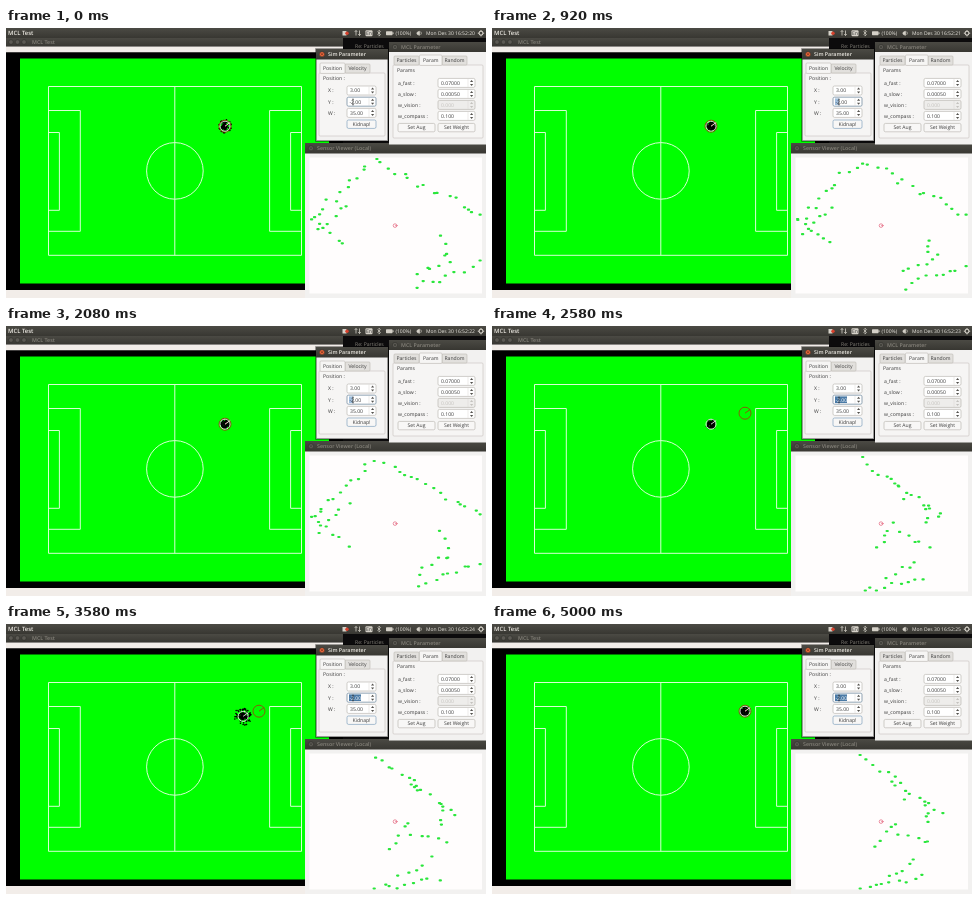
Write an HTML page that moves like this. It is 480 px wide and 270 px high and loops after 5.08 s.

```html
<!DOCTYPE html>
<html lang="en">
<head>
<meta charset="utf-8">
<title>MCL Test</title>
<style>
  html, body { margin: 0; width: 100%; height: 100%; overflow: hidden; background: #000; }
  svg { display: block; width: 480px; height: 270px; }
  text { font: 5.1px "Open Sans", "Noto Sans", sans-serif; fill: #3c3c3c; text-rendering: geometricPrecision; white-space: pre; }
  .title { font-weight: 600; font-size: 5.3px; fill: #eeebe4; }
  .head { font-size: 5.9px; }
  .tray { font-weight: 400; font-size: 5px; }
  .dim { fill: #85827a; }
  .off { fill: #c4c2be; }
  .mid { text-anchor: middle; }
</style>
</head>
<body>
<svg id="stage" viewBox="0 0 480 270"></svg>
<script>
const LOOP = 5080, TICK = 250 / 3, LAST = 60;
const SELECT = 3, KIDNAP = 27;
const HOME = [219, 98.2], GOAL = [253, 87.2];

// Field lines in the robot's view, as x1, y1, x2, y2.
const BEFORE = [
  [371, 133, 475, 188], [362, 139, 306, 191], [306, 192, 340, 216], [341, 178, 311, 205],
  [436, 209, 442, 230], [441, 232, 412, 244], [411, 260, 474, 236]];
const AFTER = [
  [369, 132, 450, 192], [404, 154, 412, 171], [436, 180, 434, 200], [403, 198, 384, 224],
  [408, 207, 437, 221], [424, 237, 396, 252], [430, 254, 370, 265]];

const rect = (x, y, w, h, fill, more = '') =>
  `<rect x="${x}" y="${y}" width="${w}" height="${h}" fill="${fill}" ${more}/>`;
const text = (x, y, s, cls = '', more = '') => `<text x="${x}" y="${y}" class="${cls}" ${more}>${s}</text>`;
const disc = (x, y, r, fill, more = '') => `<circle cx="${x}" cy="${y}" r="${r}" fill="${fill}" ${more}/>`;
const ring = (x, y, r, color, w) => disc(x, y, r, 'none', `stroke="${color}" stroke-width="${w}"`);
const path = (d, color, w = 1, more = '') =>
  `<path d="${d}" fill="none" stroke="${color}" stroke-width="${w}" ${more}/>`;
const edge = (c, r = 1) => `stroke="${c}" stroke-width=".6" rx="${r}"`;
const knob = (x, y, r, fill = '#5b5953') => disc(x, y, r, fill, 'stroke="#2b2a27" stroke-width=".5"');

const titleBar = (x, y, w, h, s, active) =>
  rect(x, y, w, h, 'url(#bar)') + knob(x + 6, y + h / 2, 2.6, active ? '#e8653a' : undefined) +
  path(`M${x + 5} ${y + h / 2 - 1}l2 2m0-2l-2 2`, active ? '#5a2412' : '#35342f', .6) +
  text(x + 12, y + h / 2 + 2, s, active ? 'title' : 'title dim');

const tab = (x, y, w, s, on) =>
  rect(x, y + (on ? 0 : 1), w, on ? 10.4 : 9, on ? '#f6f5f4' : '#e2e0dd', edge('#bdb9b4')) +
  text(x + w / 2, y + 7.2, s, 'mid');

const spin = (x, y, w, value, off) =>
  rect(x, y, w, 9, off ? '#eeedeb' : '#fff', edge('#b4b0aa', 1.5)) +
  path(`M${x + w - 7} ${y + .5}v8`, '#d8d5d0', .5) +
  `<path d="M${x + w - 5} ${y + 3.5}l1.6-2l1.6 2zm0 2l1.6 2l1.6-2z" fill="${off ? '#c4c2be' : '#55534f'}"/>` +
  text(x + 3, y + 6.4, value, off ? 'off' : '');

const button = (x, y, w, s, color = '#b4b0aa') =>
  rect(x, y, w, 8.4, '#f8f7f6', edge(color, 1.5)) + text(x + w / 2, y + 6, s, 'mid');

function panel() {
  const ink = '#d5d1c8';
  return rect(0, 0, 480, 10, 'url(#bar)') + text(2, 7, 'MCL Test', 'title head') +
    rect(336.5, 3, 4, 4.5, ink) + disc(341, 5.2, 1.7, '#d8402c') +
    path('M350 7.5v-5m-1.3 1.4l1.3-1.4l1.3 1.4M353.5 2.5v5m-1.3-1.4l1.3 1.4l1.3-1.4', ink, .8) +
    rect(359.5, 2.2, 7, 6, ink, 'rx="1"') + text(363, 6.8, 'En', 'mid') +
    path('M371.5 3.5l3 3l-1.5 1.6v-6l1.5 1.5l-3 3', ink, .7) +
    rect(380, 3.2, 6.5, 4, ink, 'rx=".6"') + rect(386.5, 4.3, 1, 1.8, ink) +
    text(389.5, 7, '(100%)', 'title tray') +
    path('M411 4.5v1.6l2.4 1.2v-4z', ink, .8, `style="fill:${ink}"`) +
    path('M414.7 3.6q1.3 1.6 0 3.2', ink, .7) +
    text(420, 7, '', 'title tray', 'id="clock"') +
    ring(475, 5.2, 1.9, ink, 1.1) +
    path('M475 2v1.2m0 4v1.2M471.8 5.2h1.2m4 0h1.2', ink);
}

function fieldWindow() {
  const chalk = '#d8ffd4';
  return rect(0, 10, 337, 8.5, 'url(#bar)') + [5, 11.5, 18].map(x => knob(x, 14, 2.3)).join('') +
    text(26, 16, 'MCL Test', 'title dim') +
    rect(0, 18.5, 337, 6, '#f2ede9') + rect(0, 24.5, 337, 237.5, '#000') +
    rect(0, 262, 337, 8, '#f2ede9') + rect(14, 30.5, 309, 225, '#00ff00') +
    path('M42.5 58.5H295.5V227.3H42.5zM168.8 58.5V227.3M42.5 82.5H74.3V203.3H42.5M42.5 104.5H53.4V182.3H42.5' +
      'M295.5 82.5H263.6V203.3H295.5M295.5 104.5H284.6V182.3H295.5', chalk) +
    ring(168.9, 142.9, 28.3, chalk, 1);
}

function simWindow() {
  return rect(310, 21, 72, 92, '#f2f1f0', 'stroke="#000" stroke-opacity=".45" stroke-width="1.6"') +
    titleBar(310, 21, 72, 10.5, 'Sim Parameter', true) +
    rect(313, 45, 66, 63, '#f6f5f4', edge('#c6c2bd')) +
    tab(339, 35, 25, 'Velocity') + tab(314, 35, 25, 'Position', true) +
    text(317, 52, 'Position :') +
    text(322, 64.4, 'X :') + spin(341, 58, 29, '3.00') +
    text(322, 75.6, 'Y :') + spin(341, 69.2, 29, '') +
    text(322, 86.8, 'W :') + spin(341, 80.4, 29, '35.00') +
    rect(341, 69.2, 29, 9, 'none', edge('#7fa0bd', 1.5)) +
    rect(343, 70.4, 4, 6.6, '#9fbfdd', 'id="mark"') + text(343.4, 75.6, '-2.00', '', 'id="yval"') +
    path('M346 71.2h2m-1 0v5.6m-1 0h2', '#333', .6) +
    button(341, 92, 29, 'Kidnap!', '#6f95b5');
}

function paramWindow() {
  const rows = [['a_fast :', '0.07000'], ['a_slow :', '0.00050'], ['w_vision :', '0.000'], ['w_compass :', '0.100']];
  return rect(383, 14, 97, 102.5, '#f2f1f0') + titleBar(383, 14, 97, 10, 'MCL Parameter') +
    rect(387, 37, 90, 73, '#f6f5f4', edge('#c6c2bd')) +
    tab(388, 27, 25, 'Particles') + tab(436, 27, 25, 'Random') + tab(413.5, 27, 22.5, 'Param', true) +
    text(391, 44, 'Params') +
    rows.map(([s, v], i) => text(392, 56.8 + i * 11, s) + spin(432, 50.4 + i * 11, 37, v, i === 2)).join('') +
    button(392, 95.4, 37, 'Set Aug') + button(432, 95.4, 37, 'Set Weight');
}

function sensorWindow() {
  return rect(299, 115, 181, 155, '#f2f1f0') + titleBar(299, 115, 181, 10.5, 'Sensor Viewer (Local)') +
    rect(303.5, 129.5, 172.5, 136, '#fffdfd') +
    path('', '#2ae63c', 2.2, 'id="seen" stroke-linecap="round"') +
    ring(389, 197.6, 1.8, '#e2607a', .7) + path('M389 197.6h3', '#e2607a', .6);
}

const pose = (id, color, r, w) =>
  `<g id="${id}">${ring(0, 0, r, color, w)}${path('M0 0L5.2-3.7', color, w)}</g>`;

document.getElementById('stage').innerHTML =
  `<defs><linearGradient id="bar" x2="0" y2="1"><stop stop-color="#4b4a44"/><stop offset="1" stop-color="#383732"/></linearGradient></defs>` +
  rect(0, 0, 480, 270, '#0c0b0c') + fieldWindow() +
  path('', '#000', 1.5, 'id="cloud" stroke-linecap="round"') +
  pose('real', '#a83410', 6, .8) + pose('guess', '#fff', 5, .8) +
  rect(337, 10, 143, 105, '#0c0b0c') + text(349, 19.5, 'Re: Particles', 'dim') +
  sensorWindow() + paramWindow() + simWindow() + panel();

const [clock, cloud, seen, real, guess, mark, yval] =
  ['clock', 'cloud', 'seen', 'real', 'guess', 'mark', 'yval'].map(id => document.getElementById(id));

function random(seed) {
  let a = seed * 7919 + 17;
  return () => {
    a = (a + 0x6D2B79F5) | 0;
    let t = Math.imul(a ^ (a >>> 15), a | 1);
    t ^= t + Math.imul(t ^ (t >>> 7), t | 61);
    return ((t ^ (t >>> 14)) >>> 0) / 4294967296;
  };
}

const clamp = (v, lo, hi) => Math.min(hi, Math.max(lo, v));
const mix = (a, b, u) => a + (b - a) * u;
const dot = (x, y, w) => `M${x.toFixed(1)} ${y.toFixed(1)}h${w}`;

// Every line is seen at regular places, with noise that is new in each tick.
function sightings(k) {
  const rnd = random(k + 1), noise = () => (rnd() + rnd() - 1) * 5;
  let d = '';
  for (const [x1, y1, x2, y2] of k < KIDNAP ? BEFORE : AFTER) {
    const n = Math.round(Math.hypot(x2 - x1, y2 - y1) / 8);
    for (let i = 0; i <= n; i++) {
      const x = mix(x1, x2, i / n) + noise(), y = mix(y1, y2, i / n) + noise();
      d += dot(clamp(x - .6, 305, 473.5), clamp(y, 131, 264.5), 1.2);
    }
  }
  return d;
}

function particles(k, x, y, spread) {
  const rnd = random(k + 500);
  let d = '';
  for (let i = 0; i < 170; i++) {
    const r = spread * rnd() ** 1.3, a = rnd() * Math.PI * 2;
    d += dot(x + r * Math.cos(a), y + r * Math.sin(a), .1);
  }
  // A lost robot scatters guesses that soon die out.
  for (const lost of [1, KIDNAP]) {
    const age = k - lost, n = age < 0 ? 0 : Math.floor(12 * .5 ** age);
    for (let i = 0; i < n; i++) d += dot(mix(146 + 10 * age, 290, rnd()), mix(60, 215, rnd()), .1);
  }
  return d;
}

function draw(k) {
  const moved = k >= KIDNAP, u = clamp((k - 31) / 22.5, 0, 1);
  const [x, y] = HOME.map((v, i) => mix(v, GOAL[i], u));
  const spread = 5.2 + 4 * Math.sin(Math.PI * u) + Math.max(0, 1.5 - k / 2);
  const at = p => `translate(${p})`;
  clock.textContent = 'Mon Des 30 16:52:' + (20 + Math.floor((k + 6) / 12));
  seen.setAttribute('d', sightings(k));
  cloud.setAttribute('d', particles(k, x, y, spread));
  guess.setAttribute('transform', at([x, y]));
  real.setAttribute('transform', at(moved ? GOAL : HOME));
  mark.setAttribute('width', moved ? 12 : k < SELECT ? 0 : 4);
  mark.setAttribute('fill', moved ? '#4a7aa6' : '#9fbfdd');
  yval.style.fill = moved ? '#fff' : '';
}

let shown = -1;
const start = performance.now();
function frame() {
  const t = (performance.now() - start) % LOOP;
  const k = Math.min(LAST, Math.floor((t + 4) / TICK));
  if (k !== shown) draw(shown = k);
  requestAnimationFrame(frame);
}
frame();
</script>
</body>
</html>
```
